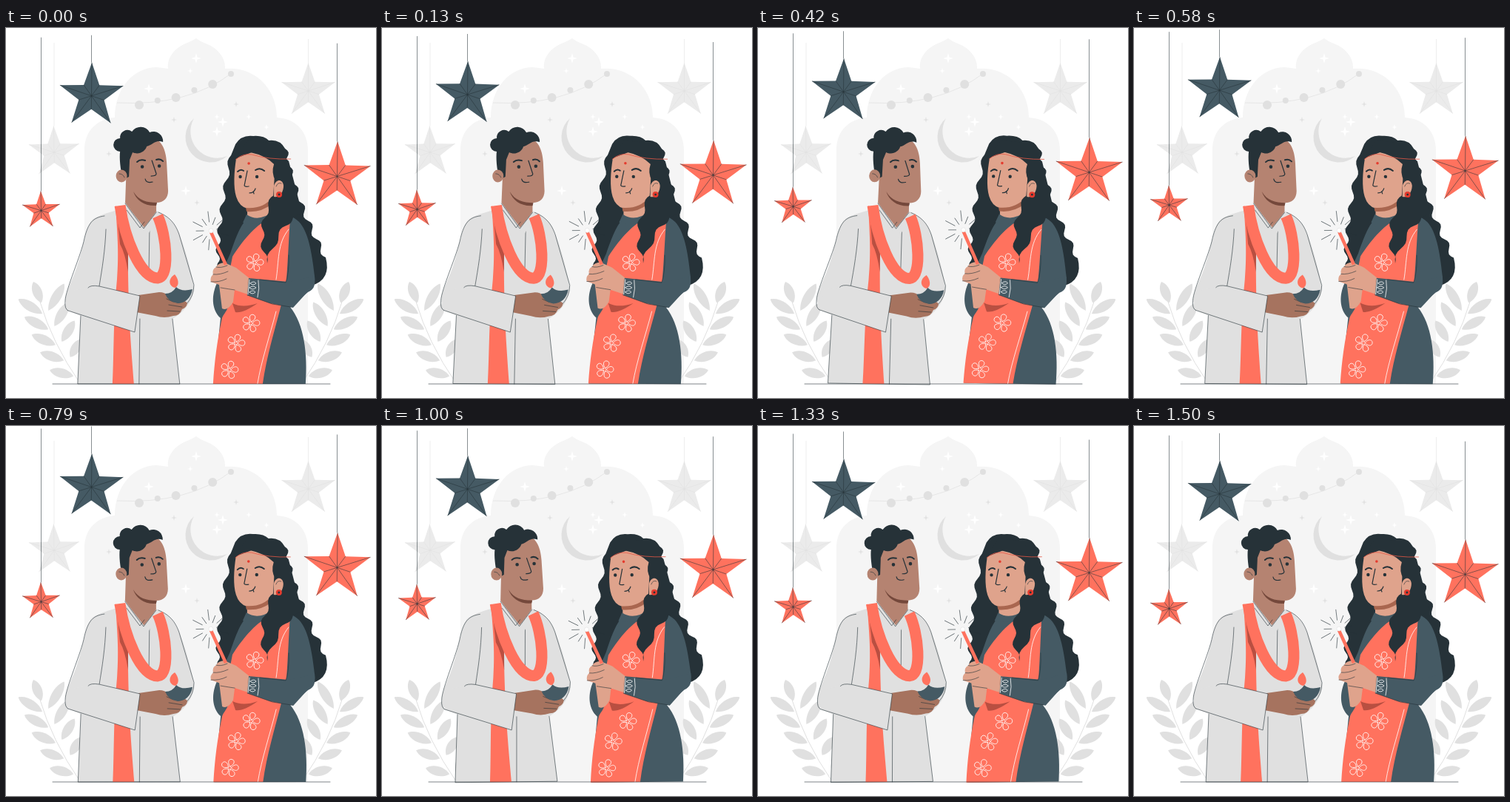
Recreate the animation shown at these times as an HTML page. Size 500 by 500 pixels, loop 1540 ms.

```html
<!DOCTYPE html>
<html lang="en">
<head>
<meta charset="utf-8">
<title>Festival of lights</title>
<style>
  html, body { margin: 0; width: 100%; height: 100%; overflow: hidden; background: #fff; }
  svg { display: block; width: 100vw; height: 100vh; }
  .line, .face, .white { fill: none; stroke: #263238; stroke-width: .6; stroke-linecap: round; stroke-linejoin: round; }
  .face { stroke-width: 1.2; }
  .brow { stroke-width: 2; }
  .white { stroke: #fff; stroke-width: .8; }
  .pale { fill: #e0e0e0; }
  .red { fill: #ff725e; }
  .shade { fill: #b94f41; }
  .teal { fill: #455a64; }
  .ink { fill: #263238; }
  .tan { fill: #b58371; }
  .rose { fill: #dfa38c; }
</style>
</head>
<body>
<svg viewBox="0 0 500 500">
  <path fill="#f5f5f5" d="M106 481V165C106 140 122 123 147 121C147 82 172 53 204 53L219 55C217 38 231 25 245 20Q252 17 257 14Q262 18 270 21C286 27 297 40 296 55C334 51 366 80 366 121C391 122 408 140 408 165V481Z"/>
  <path d="M150 101Q246 106 305 61" fill="none" stroke="#e0e0e0" stroke-width=".7"/>
  <path class="pale" d="M254 122A34 34 0 0 0 299 173A36 36 0 0 1 254 122Z"/>
  <g id="sky"></g>
  <g id="plantL"></g>
  <g id="plantR" transform="translate(500) scale(-1 1)"></g>
  <g id="farStars"></g>
  <g id="stars"></g>

  <g id="man">
    <path class="pale" d="M160 243C145 248 122 253 115 261C106 275 104 300 95 325C88 345 80 358 80 369L86 383L101 389L97 481H235L225 393C240 385 254 368 254 350C250 325 240 290 231 272C225 258 213 252 203 247L190 240Z"/>
    <path class="line" d="M133 254C117 256 111 264 106 284C102 306 80 355 80 369Q79 380 84 382M101 389L97 481H235L225 393M135 272C134 300 130 325 126 349M206 249C224 256 230 268 234 279L254 347Q254 362 244 373M181 393L180 481M194 265L193 334"/>
    <path class="red" d="M148 240C150 275 153 300 150 340C145 390 146 440 144 481H173C170 440 166 400 165 330L160 255Z"/>
    <path class="shade" d="M151 261L154 292Q161 304 165 330V298Z"/>
    <path class="tan" d="M163 178L161 236L186 270L203 249V236C213 236 219 230 219 220L217 182C216 162 208 148 195 149L170 158Z"/>
    <path fill="#74483b" d="M172 221C179 233 190 236 204 236L203 240C187 241 176 233 172 221Z"/>
    <path class="pale" d="M160 236L187 270L203 248L206 254L189 284L184 270L170 261Z"/>
    <path class="line" d="M161 237L186 271L203 249M163 246L181 270L187 262"/>
    <path d="M154 240C160 282 181 338 205 338C222 336 217 280 205 254" fill="none" stroke="#ff725e" stroke-width="15"/>
    <path class="ink" d="M158 205C154 190 153 175 154 167A9 9 0 0 1 154 149A10 10 0 0 1 170 140A14 14 0 0 1 194 141A13 13 0 0 1 212 154C202 150 198 158 190 160C188 167 179 172 171 168L167 178L166 201Z"/>
    <ellipse class="tan" cx="156" cy="200" rx="7.500" ry="8.500"/>
    <path class="line" d="M153 197Q158 197 160 202"/>
    <circle class="ink" cx="184" cy="187.500" r="2.300"/>
    <circle class="ink" cx="207" cy="186.500" r="2.300"/>
    <path class="face brow" d="M177 181Q181 177 188 179M203 178Q208 176 212 180"/>
    <path class="face" d="M197 179L203 197Q203 200 196 200M188 204Q189 210 198 208"/>
    <path fill="#a6735f" d="M179 361L207 357Q215 357 219 362L232 369Q243 367 245 372Q244 378 238 380Q235 389 226 389Q214 393 202 389L176 384Z"/>
    <path class="line" d="M217 366Q225 371 234 371M220 374L238 377M218 382L235 383"/>
    <path class="teal" d="M215 359Q225 359 230 350Q237 357 252 353C250 365 242 372 232 372Q219 370 215 359Z"/>
    <path class="red" d="M228 333C218 339 220 350 229 351C235 347 233 339 228 333Z"/>
    <path class="pale" d="M111 351Q114 347 126 349L181 362L174 411L84 382L90 355Z"/>
    <path class="line" d="M111 351Q114 347 126 349L181 362L174 411L84 382"/>
  </g>

  <g id="woman">
    <path id="backHair" class="ink"/>
    <path class="teal" d="M328 256C317 264 310 285 303 305L285 345C278 360 277 380 290 392L281 481H405C408 440 403 400 384 377L408 357C418 353 418 345 417 335C413 300 408 275 396 262C388 254 375 250 360 250Z"/>
    <path class="red" d="M355 258C336 267 318 290 306 309L298 350C306 380 296 382 292 392C285 425 282 450 280 481H347C352 445 363 409 372 374L379 340C381 315 382 285 384 256Z"/>
    <path class="shade" d="M306 372Q320 379 340 372Q320 386 310 384Z"/>
    <path class="white" d="M382 272C366 291 369 316 365 340M365 383C357 415 345 450 340 481"/>
    <g id="flowers"></g>
    <path class="rose" d="M311 176C308 195 307 215 311 228Q315 241 326 244V255Q340 263 357 251L361 228L364 181L340 165Z"/>
    <path fill="#a9664f" d="M324 243Q347 245 360 229L359 238Q344 250 325 248Z"/>
    <path class="teal" d="M325 252Q341 263 361 248L365 258Q342 268 320 263Z"/>
    <path id="frontHair" class="ink"/>
    <path class="rose" d="M362 213C365 203 374 204 375 213C375 222 369 230 362 228Z"/>
    <path class="line" d="M365 214Q367 208 372 210"/>
    <circle cx="369" cy="225" r="4" fill="#e53b2e"/>
    <circle class="ink" cx="369" cy="225" r="1.400"/>
    <path d="M310 178Q320 169 332 171Q355 178 385 177" fill="none" stroke="#e65745" stroke-width=".8"/>
    <circle cx="328" cy="183" r="1.800" fill="#e53b2e"/>
    <circle class="ink" cx="316.500" cy="201" r="2.200"/>
    <circle class="ink" cx="339" cy="201" r="2.200"/>
    <path class="face brow" d="M313 194Q317 190 321 193M337 192Q343 188 349 193"/>
    <path class="face" d="M326 193L322 213Q323 215 328 214M329 223Q335 223 337 217M334 221L335 224"/>
    <path class="rose" d="M288 347L292 379Q300 383 307 370L309 354L327 360L330 339L311 324L295 317Q286 318 284 323Q278 326 280 333Q275 337 277 343Z"/>
    <path class="line" d="M284 323Q290 325 299 321M280 333Q289 334 300 329M277 343Q288 344 298 339M290 351Q302 353 309 354"/>
    <path d="M277 276L297 320" stroke="#ff725e" stroke-width="4.500"/>
    <circle cx="277" cy="274" r="3" fill="#fff" stroke="#e0e0e0" stroke-width=".6"/>
    <g id="sparks"></g>
    <path class="teal" d="M328 338L382 343L417 335Q419 347 409 355L388 378L357 372L326 361Z"/>
    <path class="line" d="M343 340L378 344Q383 330 382 307M326 361L360 373L385 377"/>
    <path class="white" d="M329 340L327 360M341 341Q343 352 340 364M330 345q5-4 8 0q-4 4-8 0m-1 6q5-4 9 0q-5 4-9 0m0 6q5-4 8 0q-4 4-8 0"/>
  </g>
  <path class="line" d="M63 481H438"/>
</svg>
<script>
const el = id => document.getElementById(id);
const add = (id, markup) => el(id).insertAdjacentHTML('beforeend', markup);
const times = (n, f) => Array.from({ length: n }, (_, i) => f(i));
const polar = (r, a) => [r * Math.cos(a), r * Math.sin(a)];
const quad = (a, b, c, t) => (1 - t) ** 2 * a + 2 * t * (1 - t) * b + t * t * c;

// Sky: lanterns on the garland and four-pointed twinkles
times(6, i => add('sky', `<circle class="pale" cx="${180 + 24.8 * i}" cy="${102 - 3 * i - i * i + (i % 2 ? 0 : 2)}" r="${i % 2 ? 4 : 6}"/>`));
function twinkle(x, y, r, fill) {
  const tips = times(8, i => polar(i % 2 ? r * .3 : r, i * Math.PI / 4).join());
  add('sky', `<path transform="translate(${x} ${y})" fill="${fill}" d="M${tips.join('L')}Z"/>`);
}
[[257, 41], [249, 58], [193, 82], [285, 120], [293, 127], [352, 134], [243, 220], [328, 120], [285, 140]]
  .forEach(([x, y], i) => twinkle(x, y, i % 2 ? 4 : 7, '#fff'));
[[139, 170], [227, 124], [311, 103], [258, 236]].forEach(([x, y]) => twinkle(x, y, 4, '#e0e0e0'));

// Plants: leaf pairs along a curved stem
function leaf(x, y, dx, dy) {
  const len = Math.hypot(dx, dy), turn = Math.atan2(dy, dx) * 180 / Math.PI;
  return `<path class="pale" transform="translate(${x} ${y}) rotate(${turn})"
    d="M3 0C${len * .35}-9 ${len * .8}-8 ${len} 0C${len * .8} 8 ${len * .35} 9 3 0Z"/>`;
}
const plant = '<path d="M46 370Q62 425 100 480" fill="none" stroke="#e0e0e0"/>' + leaf(49, 374, -12, -31) +
  times(5, i => {
    const t = .16 + i * .19, x = quad(46, 62, 100, t), y = quad(370, 425, 480, t);
    return leaf(x, y, -35, 3 * i - 21) + leaf(x + 4, y - 3, 23 - 2 * i, 4 * i - 39);
  }).join('');
add('plantL', plant);
add('plantR', plant);

// Hanging stars
function star(layer, x, y, r, top, fill, stroke, turn) {
  const rim = times(10, i => polar(i % 2 ? r * .4 : r, (i / 5 - .5) * Math.PI).join());
  add(layer, `<g stroke="${stroke}" stroke-width=".55"><path d="M${x} ${top}V${y - r}"/>
    <g transform="translate(${x} ${y}) rotate(${turn})"><path d="M${rim.join('L')}Z" fill="${fill}" stroke="none"/>
    <path d="${rim.map(p => 'M0 0L' + p).join('')}"/></g></g>`);
}
star('farStars', 65, 168, 35.7, 20, '#ebebeb', '#e0e0e0', -1);
star('farStars', 408.5, 85, 38, 15, '#ebebeb', '#e0e0e0', 0);
star('stars', 47.5, 247, 26.6, 13, '#ff725e', '#263238', -1);
star('stars', 115.5, 92, 45, 10, '#455a64', '#263238', .7);
star('stars', 447.5, 200.8, 47.2, 21, '#ff725e', '#263238', .7);

// Curly hair: a sine ripple laid along a quadratic curve
function ripple(x0, y0, cx, cy, x1, y1, curls, amp) {
  return times(curls * 8 + 1, i => {
    const t = i / (curls * 8), s = amp * Math.sin(t * curls * 2 * Math.PI);
    const dx = quad(x0, cx, x1, t + .01) - quad(x0, cx, x1, t), dy = quad(y0, cy, y1, t + .01) - quad(y0, cy, y1, t);
    const k = s / Math.hypot(dx, dy);
    return `L${quad(x0, cx, x1, t) + dy * k} ${quad(y0, cy, y1, t) - dx * k}`;
  }).join('');
}
el('backHair').setAttribute('d', 'M310 157Q318 144 334 146Q348 145 355 152Q370 150 377 163' +
  ripple(377, 163, 392, 235, 432, 310, 6, 3.5) + 'Q440 340 413 348L380 300L300 325L285 322' +
  ripple(286, 318, 286, 260, 304, 172, 5, -3) + 'Z');
el('frontHair').setAttribute('d', 'M306 182Q314 172 330 168Q350 172 362 184Q358 196 364 206L362 226' +
  ripple(362, 226, 336, 272, 353, 318, 3, -3) + ripple(353, 318, 366, 276, 388, 256, 2, 3) + 'L400 250L382 180L356 155L326 152Z');

// Sari flowers
[[336, 317], [331, 399], [311, 426], [302, 462]].forEach(([x, y]) => times(5, i =>
  add('flowers', `<path class="white" transform="translate(${x} ${y}) rotate(${i * 72 + 15})" d="M0-2C-6-7-4-12 0-12C4-12 6-7 0-2Z"/>`)));

// Sparkler rays, open on the side of the stick
times(11, i => add('sparks', `<path class="line" transform="translate(276 274) rotate(${95 + i * 28})" d="M${i % 2 ? 9 : 12} 0H${i % 2 ? 19 : 26}"/>`));

const LOOP = 1540, LEAD = 20;
function draw(now) {
  const p = ((now + LEAD) % LOOP) / LOOP;
  const lift = 10 * (1 - Math.abs(1 - 2 * p));
  const sway = p < .25 ? 4 * p : p < .75 ? 2 - 4 * p : 4 * p - 4;
  el('stars').setAttribute('transform', `translate(0 ${-lift})`);
  el('man').setAttribute('transform', `rotate(${sway} 166 309)`);
  el('woman').setAttribute('transform', `rotate(${sway} 357 314)`);
}
const start = performance.now();
function tick() {
  draw(performance.now() - start);
  requestAnimationFrame(tick);
}
tick();
</script>
</body>
</html>
```
